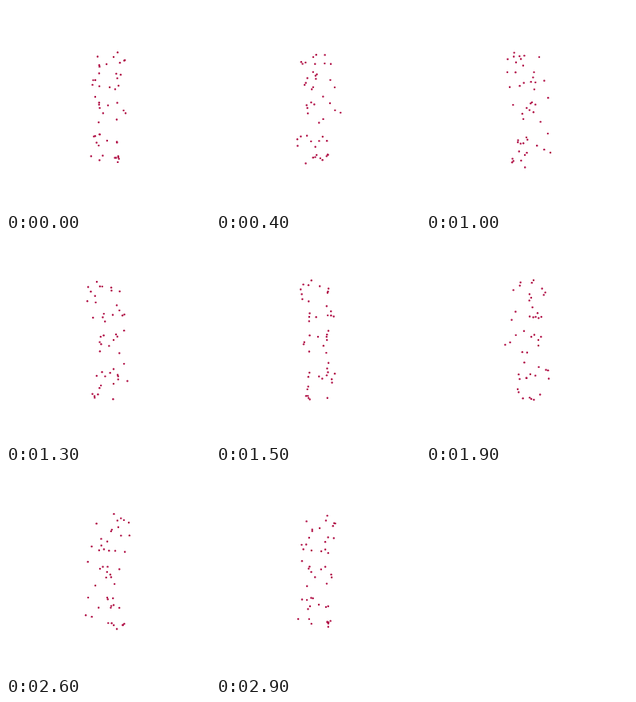
Animation, 256 px wide and 256 px high, one loop 3 s. Source, as an HTML page with a canvas:

```html
<!DOCTYPE html>
<html lang="en">
<head>
<meta charset="utf-8">
<title>Rotating point cloud</title>
<style>
  html, body { margin: 0; width: 100%; height: 100%; overflow: hidden; background: #fff; }
  canvas { display: block; width: 256px; height: 256px; }
</style>
</head>
<body>
<canvas id="stage" width="256" height="256"></canvas>
<script>
const LOOP = 3000, STEP = 100, CENTER = 128, FOCAL = 200, RADIUS = 1.2;
const ctx = document.getElementById('stage').getContext('2d');

// x, y, depth of each point around the vertical axis, top to bottom
const points = [
  [12, -69.3, -1.3], [-12.5, -61.8, -8.5], [7.6, -69, 15.5], [21, -61.5, 6.5],
  [20.8, -58.7, -4.3], [16.5, -62.5, 20.5], [-2, -60.6, 20.5], [-12, -58.7, 18],
  [-11.5, -56, 16], [-11, -43, -2], [11, -45.6, 12], [17.6, -46, 20.5],
  [11, -35.3, -11], [-17.4, -32.7, -12.5], [-16.1, -35.5, 2.5], [-19.6, -29.3, 1.5],
  [-11.5, -29, 12.2], [2.2, -27.3, 10.5], [9.9, -26, 20.5], [12.1, -25.6, -17],
  [-14.4, -12.6, -20.5], [-11.2, -6.8, 1], [-11, -4.2, -4], [-10.8, 0, 8],
  [0, -3.7, 20.5], [11, -6.1, -10.5], [-6.5, 6.9, 11.5], [18.3, 2.9, -13],
  [19.8, 5.9, -20.5], [11, 14.5, 0.7], [-11, 17, -11.5], [-11, 34.3, 8.5],
  [-14.5, 31.7, -20], [-19.3, 38.7, 17], [-11.3, 36.6, 19.5], [-15.8, 48, 20.5],
  [-11.3, 45.7, -6], [-1.2, 43.2, 11], [11, 42.2, -5.5], [11.6, 44.3, 8.4],
  [-19, 54.3, -20.5], [-5.9, 53.5, -20.7], [-11.2, 69, 10.5], [11, 67.2, 15],
  [9.4, 68, 17.5], [13.8, 65, 15], [12.6, 60, -5.5], [13.5, 62.8, -3], [12.5, 69, 3.2]
];

function drawPoint([x, y, z], cos, sin) {
  const scale = FOCAL / (FOCAL + z * cos + x * sin);
  ctx.beginPath();
  ctx.arc(CENTER + (x * cos - z * sin) * scale, CENTER + y * scale, RADIUS, 0, 2 * Math.PI);
  ctx.fill();
}

function draw(now) {
  const time = Math.floor((now % LOOP) / STEP) * STEP;
  const angle = 2 * Math.PI * time / LOOP;
  const cos = Math.cos(angle), sin = Math.sin(angle);
  ctx.fillStyle = '#fff';
  ctx.fillRect(0, 0, 256, 256);
  ctx.fillStyle = '#b00f45';
  points.forEach(point => drawPoint(point, cos, sin));
}

const start = performance.now();
function tick() {
  draw(performance.now() - start);
  requestAnimationFrame(tick);
}
tick();
</script>
</body>
</html>
```
